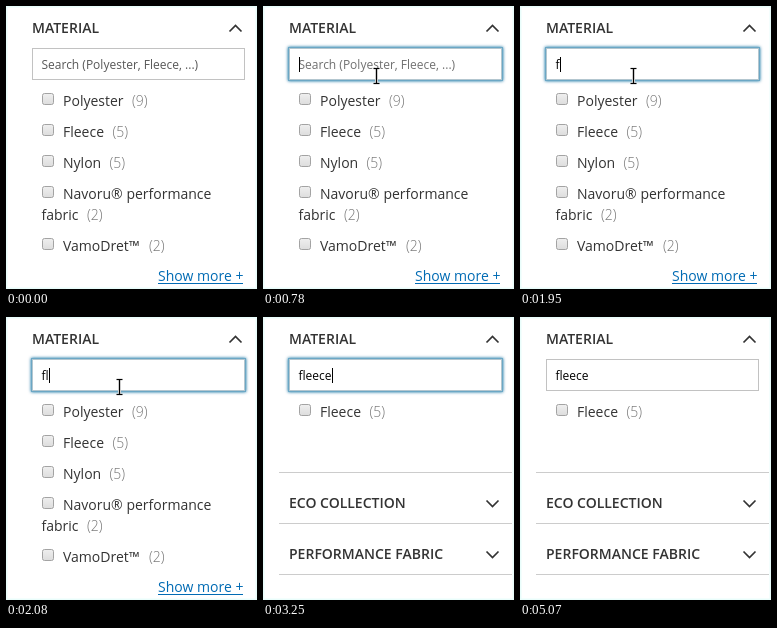
These frames come from a looping animation (251 px wide and 283 px high, 5200 ms). An HTML page with a canvas:

```html
<!DOCTYPE html>
<html lang="en">
<head>
<meta charset="utf-8">
<style>
  html, body { margin: 0; width: 100%; height: 100%; overflow: hidden; background: #fff; }
  canvas { display: block; }
</style>
</head>
<body>
<canvas id="stage" width="251" height="283"></canvas>
<script>
const ctx = document.getElementById('stage').getContext('2d');
const LOOP = 5200;
const FONT = '"Open Sans", sans-serif';

// Each step overrides only the properties that change at that time.
const steps = [
  [0, { typed: '', focus: false, caret: false, filtered: false, hover: -1, cursor: null }],
  [260, { cursor: ['hand', 122, 124], hover: 1 }],
  [390, { cursor: ['hand', 120, 92], hover: 0 }],
  [520, { cursor: ['beam', 115, 73], hover: -1 }],
  [650, { cursor: ['beam', 113, 70] }],
  [780, { focus: true, caret: true }],
  [1430, { caret: false }],
  [1950, { typed: 'f', caret: true }],
  [2080, { typed: 'fl' }],
  [2210, { filtered: true }],
  [2340, { typed: 'fle' }],
  [2600, { typed: 'flee' }],
  [2990, { typed: 'fleec' }],
  [3120, { cursor: null }],
  [3250, { typed: 'fleece' }],
  [3900, { caret: false }],
  [4290, { caret: true }],
  [5070, { focus: false, caret: false }]
];

const options = [
  { label: 'Polyester', count: 9, countX: 126, y: 100 },
  { label: 'Fleece', count: 5, countX: 106.5, y: 131 },
  { label: 'Nylon', count: 5, countX: 103.5, y: 162 },
  { label: 'Navoru® performance', wrap: 'fabric', count: 2, countX: 81, y: 193 },
  { label: 'VamoDret™', count: 2, countX: 143, y: 245 }
];

function stateAt(time) {
  return Object.assign({}, ...steps.filter(([start]) => start <= time).map(([, change]) => change));
}

function text(str, x, y, color = '#333', size = 14, weight = 400) {
  ctx.font = `${weight} ${size}px ${FONT}`;
  ctx.fillStyle = color;
  ctx.fillText(str, x, y);
}

function line(points, color, width = 1) {
  ctx.beginPath();
  points.forEach(([x, y]) => ctx.lineTo(x, y));
  ctx.strokeStyle = color;
  ctx.lineWidth = width;
  ctx.stroke();
}

function chevron(y, direction) {
  line([[223.5, y - 3 * direction], [229.5, y + 3 * direction], [235.5, y - 3 * direction]], '#333', 1.7);
}

function heading(title, y, direction) {
  text(title, 26, y, '#333', 14, 600);
  chevron(y - 4.5, direction);
}

function section(title, y) {
  heading(title, y, 1);
  line([[16, y + 15.5], [249, y + 15.5]], '#ccc');
}

function checkbox(x, y) {
  const fill = ctx.createLinearGradient(0, y, 0, y + 12);
  fill.addColorStop(0, '#f0f0f0');
  fill.addColorStop(1, '#dcdcdc');
  ctx.beginPath();
  ctx.roundRect(x + 0.5, y + 0.5, 11, 11, 2);
  ctx.fillStyle = fill;
  ctx.fill();
  ctx.strokeStyle = '#a3a3a3';
  ctx.lineWidth = 1;
  ctx.stroke();
}

function option({ label, wrap, count, countX }, y, hovered) {
  if (hovered) {
    ctx.fillStyle = '#e8e8e8';
    ctx.fillRect(31, y - 15, countX - 3, 19);
  }
  checkbox(36, y - 13);
  text(label, 57, y);
  if (wrap) text(wrap, 35.5, y + 21);
  text(`(${count})`, countX, y + (wrap ? 21 : 0), '#757575', 14, 300);
}

function searchBox({ typed, focus, caret }) {
  if (focus) {
    ctx.save();
    ctx.shadowColor = '#00699d';
    ctx.shadowBlur = 3;
    ctx.fillStyle = '#6ba7c5';
    ctx.fillRect(25, 41, 215, 34);
    ctx.restore();
  }
  ctx.fillStyle = '#fff';
  ctx.fillRect(26, 42, 213, 32);
  ctx.strokeStyle = focus ? '#b3c6cf' : '#c2c2c2';
  ctx.lineWidth = 1;
  ctx.strokeRect(26.5, 42.5, 212, 31);
  if (typed) text(typed, 35.5, 63, '#000', 12);
  else text('Search (Polyester, Fleece, ...)', 35.5, 63, focus ? '#707070' : '#575757', 12);
  if (caret) {
    ctx.font = `400 12px ${FONT}`;
    const x = Math.round(35.5 + ctx.measureText(typed).width);
    ctx.fillStyle = '#000';
    ctx.fillRect(x, 51, 1, 15);
  }
}

const hand = new Path2D(
  'M-1.5 1.5Q0 0 1.5 1.5V7Q3.5 5.5 4.5 7.5Q6.5 6.5 7.5 8.5' +
  'Q10 7.5 10.5 10V13Q10 15 8.5 16.5V18.5H0V16.5L-5.5 10.5Q-6 8 -3.5 8.5L-1.5 10.5Z'
);

function pointer([kind, x, y]) {
  ctx.save();
  ctx.translate(x, y);
  if (kind === 'hand') {
    ctx.fillStyle = '#fff';
    ctx.fill(hand);
    ctx.strokeStyle = '#000';
    ctx.lineWidth = 1.2;
    ctx.stroke(hand);
    [2, 4.8, 7.5].forEach(dx => line([[dx, 8], [dx, 11]], '#000'));
  } else {
    const stem = [[0.5, -7], [0.5, 7]];
    line(stem, '#fff', 3);
    line(stem, '#000', 1.4);
    [-7.5, 7.5].forEach(dy => line([[-2.5, dy], [3.5, dy]], '#000', 1.2));
  }
  ctx.restore();
}

function draw(time) {
  const state = stateAt(time);
  ctx.fillStyle = '#fff';
  ctx.fillRect(0, 0, 251, 283);
  ctx.strokeStyle = '#e9fdfb';
  ctx.lineWidth = 2;
  ctx.strokeRect(0.5, 0.5, 250, 282);

  heading('MATERIAL', 27, -1);
  searchBox(state);

  if (state.filtered) {
    option(options[1], 100, false);
    line([[16, 155.5], [249, 155.5]], '#ccc');
    section('ECO COLLECTION', 191);
    section('PERFORMANCE FABRIC', 242);
  } else {
    options.forEach((item, i) => option(item, item.y, i === state.hover));
    text('Show more +', 152, 275, '#006bb4');
    line([[152, 277.5], [237, 277.5]], '#006bb4');
  }
  if (state.cursor) pointer(state.cursor);
}

function tick() {
  draw(performance.now() % LOOP);
  requestAnimationFrame(tick);
}
tick();
</script>
</body>
</html>
```
